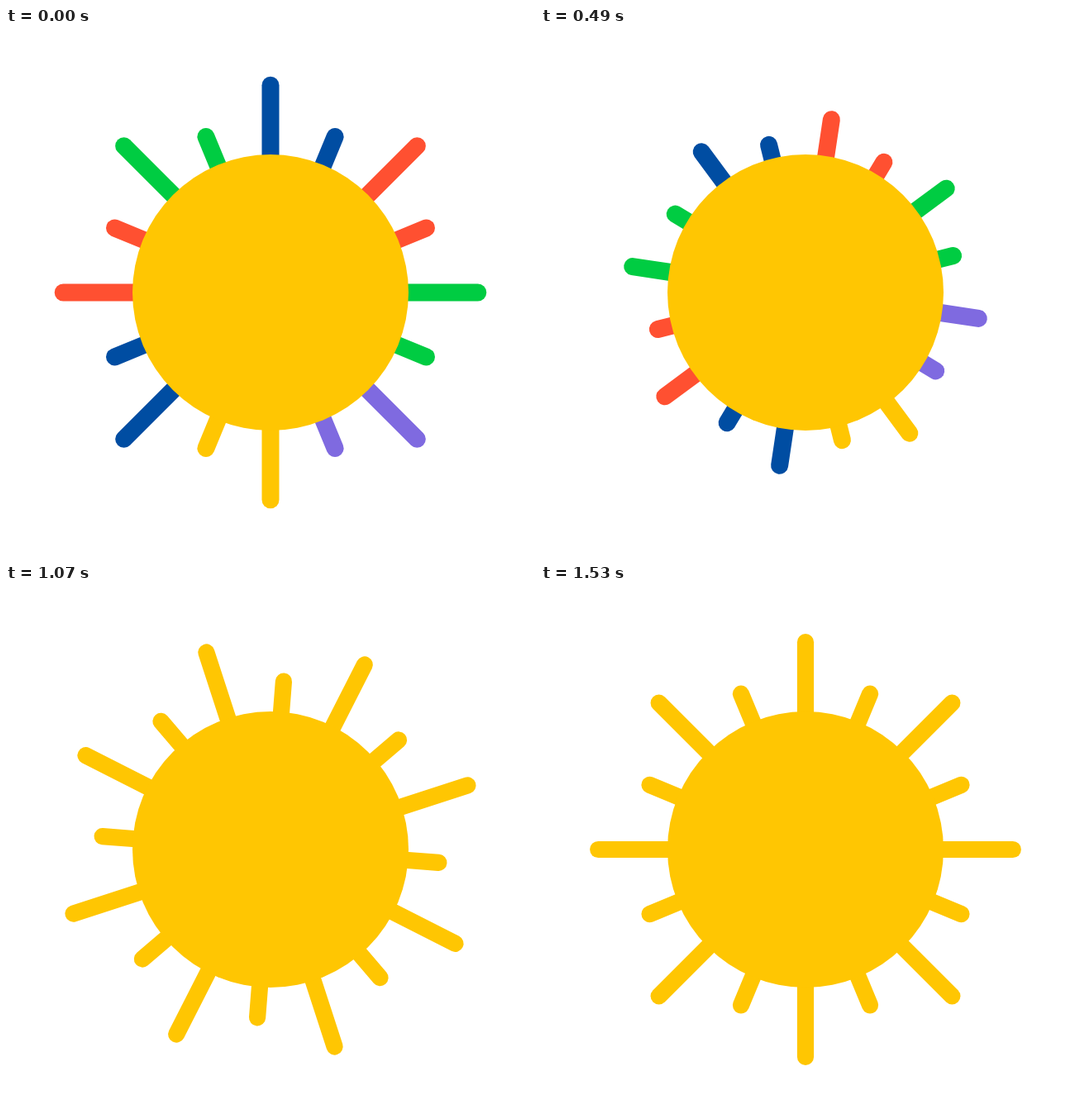
Animation, 640 px wide and 640 px high, one loop 1.63 s. Source, as an HTML page with a canvas:

```html
<!DOCTYPE html>
<html lang="en">
<head>
<meta charset="utf-8">
<title>Sun</title>
<style>
  html, body { margin: 0; width: 100%; height: 100%; overflow: hidden; background: #fff; }
  canvas { display: block; width: 640px; height: 640px; }
</style>
</head>
<body>
<canvas id="stage" width="640" height="640"></canvas>
<script>
const ctx = document.getElementById('stage').getContext('2d');

const LOOP = 1630;
const LAST_STEP = 1530;
const SWING = -37.2;
const YELLOW = '#ffc602';
const BLUE = '#004da2', RED = '#ff5031', GREEN = '#00cc42', PURPLE = '#7f6ae0';
const COLORS = [BLUE, RED, GREEN, PURPLE, YELLOW, BLUE, RED, GREEN];
const LONG = { from: 158.5, to: 250.8, offset: 0 };
const SHORT = { from: 157, to: 204, offset: 22.5 };

const progress = (t, start, end) => Math.min(1, Math.max(0, (t - start) / (end - start)));
const smooth = s => s * s * (3 - 2 * s);
const ease = (t, start, end) => smooth(progress(t, start, end));

// Bezier easing with flat ends; x1 and x2 are the control points in time.
function bezier(x, x1, x2) {
  let low = 0, high = 1;
  for (let i = 0; i < 24; i++) {
    const s = (low + high) / 2, r = 1 - s;
    const at = 3 * x1 * s * r * r + 3 * x2 * s * s * r + s * s * s;
    if (at < x) low = s; else high = s;
  }
  return smooth((low + high) / 2);
}

// Steps of 30 ms, with one step of 70 ms in every 490 ms.
function stepTime(t) {
  if (t >= LAST_STEP) return LAST_STEP;
  const u = (t + 280) % 490;
  return t - (u < 70 ? u : (u - 70) % 30);
}

function swingAngle(t) {
  const out = bezier(progress(t, 0, 550), 0.416, 0.535);
  const back = bezier(progress(t, 667, LAST_STEP), 0.393, 0.496);
  return SWING * (out - back);
}

function drawRays(angle, start, end, width, colorOf) {
  ctx.lineCap = 'round';
  ctx.lineWidth = width;
  for (const ray of [LONG, SHORT]) {
    const radius = part => ray.from + (ray.to - ray.from) * part;
    for (let i = 0; i < 8; i++) {
      const a = (angle + ray.offset + i * 45) * Math.PI / 180;
      const dx = Math.sin(a), dy = -Math.cos(a);
      const r0 = radius(start), r1 = radius(end);
      ctx.strokeStyle = colorOf(i);
      ctx.beginPath();
      ctx.moveTo(dx * r0, dy * r0);
      ctx.lineTo(dx * r1, dy * r1);
      ctx.stroke();
    }
  }
}

function draw(t) {
  ctx.setTransform(1, 0, 0, 1, 0, 0);
  ctx.fillStyle = '#fff';
  ctx.fillRect(0, 0, 640, 640);
  ctx.translate(320, 320);

  const angle = swingAngle(t);
  drawRays(angle, 0, t < 650 ? 0 : 1, 20.2, () => YELLOW);

  const wiped = ease(t, 0, 336);
  const grown = ease(t, 306, 640);
  const uncovered = ease(t, 660, 940);
  const colorOf = i => COLORS[i];
  if (wiped < 1) drawRays(angle, wiped, 1, 21, colorOf);
  if (grown > 0 && uncovered < 1) drawRays(angle, uncovered, grown, 21, colorOf);

  ctx.fillStyle = YELLOW;
  ctx.beginPath();
  ctx.arc(0, 0, 167, 0, Math.PI * 2);
  ctx.fill();
}

const began = performance.now();
function tick() {
  draw(stepTime((performance.now() - began) % LOOP));
  requestAnimationFrame(tick);
}
tick();
</script>
</body>
</html>
```
